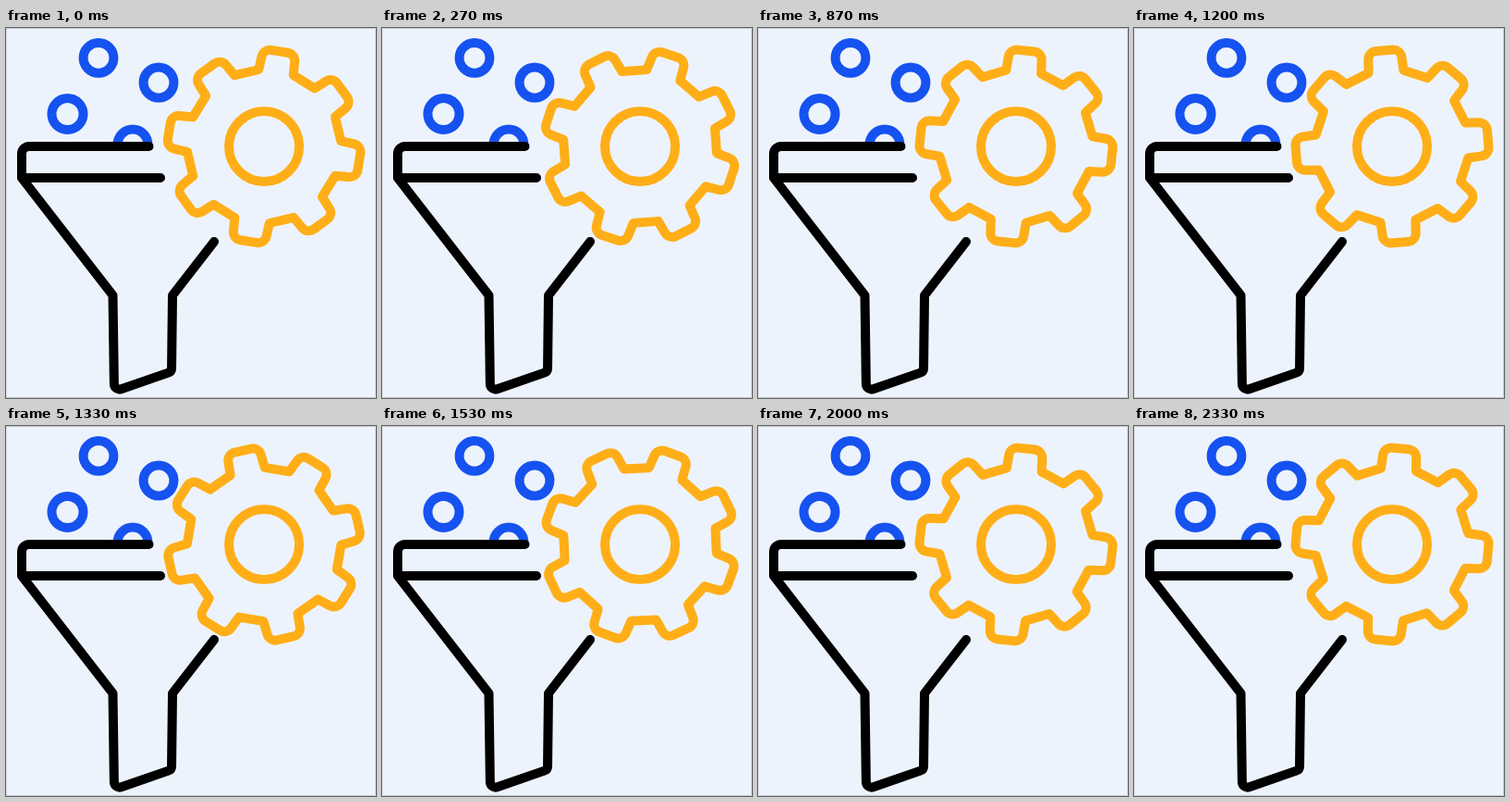
Recreate the animation shown at these times as an HTML page with a canvas. Size 400 by 400 pixels, loop 2.4 s.

```html
<!DOCTYPE html>
<html lang="en">
<head>
<meta charset="utf-8">
<title>Funnel and gear</title>
<style>
  html, body { margin: 0; width: 100%; height: 100%; overflow: hidden; background: #edf3fc; }
  canvas { display: block; width: 400px; height: 400px; }
</style>
</head>
<body>
<canvas id="stage" width="400" height="400"></canvas>
<script>
const ctx = document.getElementById('stage').getContext('2d');

const LOOP = 2400;
const STEPS = 36;
const TEETH = 8;
const BLUE = '#1552f0';
const ORANGE = '#ffae17';

// Gear swing: [step, angle in degrees], eased between keys.
const SWING = [[0, 9.2], [4, 18.2], [9, 41.4], [13.5, 51], [18, 40.4], [23, 19.8], [30, 6.2], [35, 4.9]];

function swingKey(i) {
  const n = SWING.length;
  const [step, angle] = SWING[(i + n) % n];
  return [step + Math.floor(i / n) * STEPS, angle];
}

function slopeAt(i) {
  const [s0, a0] = swingKey(i - 1), [s1, a1] = swingKey(i), [s2, a2] = swingKey(i + 1);
  const before = (a1 - a0) / (s1 - s0), after = (a2 - a1) / (s2 - s1);
  return before * after <= 0 ? 0 : 2 * before * after / (before + after);
}

function gearAngle(step) {
  let i = SWING.length - 1;
  while (SWING[i][0] > step) i--;
  const [s0, a0] = swingKey(i), [s1, a1] = swingKey(i + 1);
  const h = s1 - s0, u = (step - s0) / h, v = 1 - u;
  return a0 * v * v * (1 + 2 * u) + a1 * u * u * (1 + 2 * v)
    + h * u * v * (v * slopeAt(i) - u * slopeAt(i + 1));
}

function pen(color) {
  ctx.strokeStyle = color;
  ctx.lineWidth = 10;
  ctx.lineCap = ctx.lineJoin = 'round';
}

function ring(x, y, r) {
  ctx.beginPath();
  ctx.arc(x, y, r, 0, Math.PI * 2);
  ctx.stroke();
}

function drawBackground() {
  ctx.fillStyle = '#edf3fc';
  ctx.fillRect(0, 0, 400, 400);
  ctx.strokeStyle = '#c6cad0';
  ctx.lineWidth = 1;
  ctx.strokeRect(0.5, 0.5, 399, 399);
}

function drawDrops() {
  pen(BLUE);
  ring(100, 32.3, 16.4);
  ring(165, 59, 16.4);
  ring(66.5, 93, 17);
  ctx.save();
  ctx.beginPath();
  ctx.rect(110, 95, 55, 33);
  ctx.clip();
  ring(137, 126, 16.4);
  ctx.restore();
}

function drawFunnel() {
  pen('#000');
  ctx.beginPath();
  ctx.moveTo(154.5, 128);
  ctx.arcTo(17, 128, 17, 162, 8);
  ctx.lineTo(17, 162);
  ctx.lineTo(115.5, 289);
  ctx.arcTo(117, 393, 179, 371.5, 6);
  ctx.arcTo(179, 371.5, 180, 289, 5);
  ctx.lineTo(180, 289);
  ctx.lineTo(225, 231);
  ctx.moveTo(17, 162);
  ctx.lineTo(167, 162);
  ctx.stroke();
}

function gearPoint(x, y, tooth) {
  const a = tooth * Math.PI * 2 / TEETH;
  const c = Math.cos(a), s = Math.sin(a);
  return [x * c - y * s, x * s + y * c];
}

function drawGear(degrees) {
  pen(ORANGE);
  ctx.save();
  ctx.translate(279, 128);
  ring(0, 0, 38);
  ctx.rotate(degrees * Math.PI / 180);
  ctx.beginPath();
  for (let i = 0; i < TEETH; i++) {
    const left = gearPoint(-17.5, -104, i), right = gearPoint(17.5, -104, i);
    const end = gearPoint(19, -81, i);
    ctx.lineTo(...gearPoint(-19, -81, i));
    ctx.arcTo(...left, ...right, 9);
    ctx.arcTo(...right, ...end, 9);
    ctx.lineTo(...end);
  }
  ctx.closePath();
  ctx.stroke();
  ctx.restore();
}

function render(now) {
  // Small lead so each step starts on its rounded time.
  const step = Math.floor((now + 4) % LOOP / LOOP * STEPS);
  drawBackground();
  drawDrops();
  drawFunnel();
  drawGear(gearAngle(step));
}

let start = null;
function tick(now) {
  if (start === null) start = now;
  render(now - start);
  requestAnimationFrame(tick);
}
render(0);
requestAnimationFrame(tick);
</script>
</body>
</html>
```
